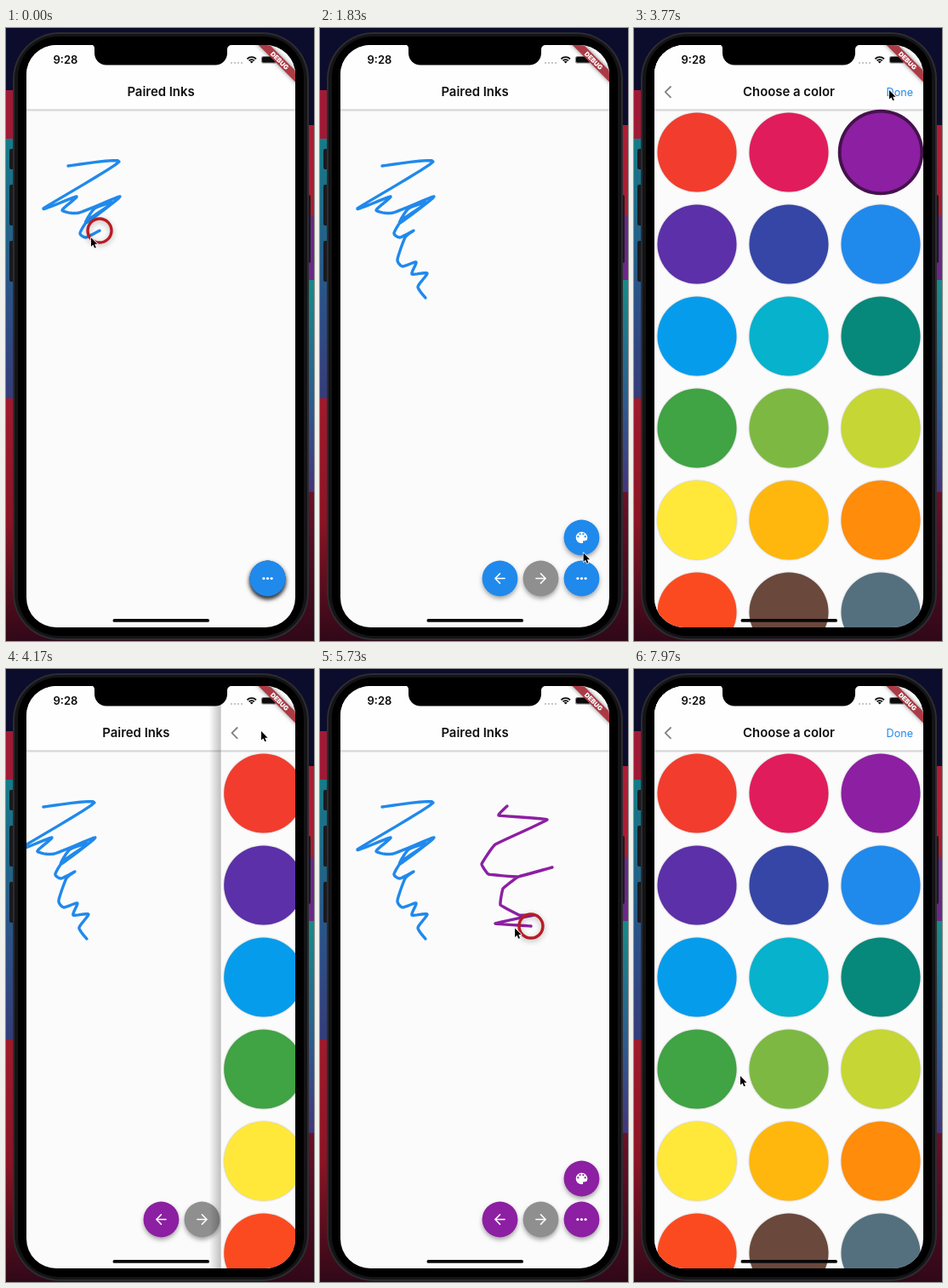
Write an HTML page with a canvas that moves like this. It is 362 by 720 pixels and loops after 8 s.

```html
<!DOCTYPE html>
<html lang="en">
<head>
<meta charset="utf-8">
<title>Drawing app</title>
<style>
html, body { margin: 0; width: 100%; height: 100%; overflow: hidden; background: #0c0c2c; }
canvas { display: block; width: 362px; height: 720px; }
</style>
</head>
<body>
<canvas id="stage"></canvas>
<script>
const W = 362, H = 720, LOOP = 8000;
const SCREEN = { x: 24, y: 20, w: 316, h: 684 };
const FONT = 'Inter, "Open Sans", sans-serif';
const BLUE = '#2089ec', PURPLE = '#8c1fa2', GREY = '#8f8f8f', INK = '#0c0c0c';
const SWATCHES = ['#f23c2e', '#e01c5c', PURPLE, '#5c30a8', '#3546a6', BLUE,
  '#069cec', '#06b2cc', '#06887a', '#40a344', '#7db942', '#c6d634', '#ffe83a',
  '#ffb70e', '#ff8c0a', '#fc4a20', '#6a483c', '#54707e'];

// Turning points of each stroke, reached one per step; bend rounds the corners.
const strokes = [
  { color: BLUE, start: -13 * 85, step: 85, bend: .3, keys: [
    [73,162], [133,157], [44,212], [83,198], [66,214], [86,217], [134,198], [94,229],
    [104,212], [126,205], [97,225], [87,241], [94,246], [110,238], [100,246], [91,272],
    [97,280], [113,275], [108,289], [126,288], [115,304], [124,317]] },
  { color: PURPLE, start: 5000, step: 52, bend: .12, keys: [
    [220,161], [210,172], [267,177], [206,206], [190,229], [198,241], [233,244], [273,233],
    [233,244], [215,258], [212,277], [234,289], [251,289], [206,299], [248,302], [229,304],
    [244,328]] }
];

// Where the pointer rests between strokes.
const stops = [
  { from: 680, to: 820, at: [124, 317] },
  { from: 1350, to: 1600, at: [309, 646] },
  { from: 2000, to: 2250, at: [310, 598] },
  { from: 3000, to: 3200, at: [290, 146] },
  { from: 3740, to: 4300, at: [300, 73] },
  { from: 4850, to: 5000, at: [216, 149] },
  { from: 5832, to: 6000, at: [244, 328] },
  { from: 6700, to: 7200, at: [318, 596] },
  { from: 7900, to: LOOP, at: [125, 478] }
];
const MENU_OPENS = 1400, PICKED = 3100, DONE = 4050;

const canvas = document.getElementById('stage');
const ctx = canvas.getContext('2d');
const clamp = (v, max = 1) => Math.max(0, Math.min(max, v));
const mix = (a, b, u) => a + (b - a) * u;
const smooth = u => u * u * (3 - 2 * u);
const easeOut = u => 1 - (1 - clamp(u)) ** 3;

// Cubic bezier (.35,.91,.33,.97) used by the page slide.
function slide(u) {
  if (u <= 0) return 0;
  if (u >= 1) return 1;
  const curve = (a, b, s) => 3 * (1 - s) ** 2 * s * a + 3 * (1 - s) * s * s * b + s ** 3;
  let lo = 0, hi = 1;
  for (let i = 0; i < 24; i++) {
    const mid = (lo + hi) / 2;
    if (curve(.35, .33, mid) < u) lo = mid; else hi = mid;
  }
  return curve(.91, .97, lo);
}

// The picker slides in, out and in again.
const pickerCover = t => [2060, DONE, 6842]
  .reduce((sum, start, i) => sum + (i % 2 ? -1 : 1) * slide((t - start) / 400), 0);

const progress = (s, t) => (t - s.start) / s.step;

// Cardinal spline through the keys.
function pointAt({ keys, bend }, i) {
  const last = keys.length - 1;
  i = clamp(i, last);
  const k = Math.min(Math.floor(i), last - 1), u = i - k;
  const key = n => keys[clamp(n, last)];
  return [0, 1].map(d => {
    const a = key(k)[d], b = key(k + 1)[d];
    const inA = bend * (b - key(k - 1)[d]), inB = bend * (key(k + 2)[d] - a);
    return mix(a, b, smooth(u)) + u * (1 - u) * ((1 - u) * inA - u * inB);
  });
}

function activeStroke(t) {
  return strokes.find(s => t >= s.start && progress(s, t) <= s.keys.length - 1);
}

function pointer(t) {
  const s = activeStroke(t);
  if (s) return pointAt(s, progress(s, t) + 1);
  const k = Math.max(0, stops.findLastIndex(p => p.from <= t));
  const here = stops[k], next = stops[k + 1];
  if (!next || t < here.to) return here.at;
  const u = smooth((t - here.to) / (next.from - here.to));
  return [0, 1].map(d => mix(here.at[d], next.at[d], u));
}

function box(x, y, w, h, r, fill) {
  ctx.beginPath();
  ctx.roundRect(x, y, w, h, r);
  ctx.fillStyle = fill;
  ctx.fill();
}

function disc(x, y, r, fill) {
  ctx.beginPath();
  ctx.arc(x, y, r, 0, 7);
  ctx.fillStyle = fill;
  ctx.fill();
}

function line(pts, color, width) {
  ctx.beginPath();
  pts.forEach(p => ctx.lineTo(...p));
  ctx.strokeStyle = color;
  ctx.lineWidth = width;
  ctx.stroke();
}

function text(str, x, y, font, color, align = 'center') {
  ctx.font = `${font} ${FONT}`;
  ctx.fillStyle = color;
  ctx.textAlign = align;
  ctx.fillText(str, x, y);
}

function shadow(color, blur, dy) {
  const k = window.devicePixelRatio || 1;
  ctx.shadowColor = color;
  ctx.shadowBlur = blur * k;
  ctx.shadowOffsetY = dy * k;
}
const noShadow = () => shadow('transparent', 0, 0);

function fade(x0, y0, x1, y1, colors) {
  const g = ctx.createLinearGradient(x0, y0, x1, y1);
  colors.forEach((c, i) => g.addColorStop(i / (colors.length - 1), c));
  return g;
}

// Each band runs from its top to the bottom of the stage, over the previous one.
function wallpaper(x, bands) {
  for (const [top, ...colors] of bands) {
    ctx.fillStyle = fade(0, top, 0, H, colors);
    ctx.fillRect(x, top, W / 2, H - top);
  }
}

function drawPhone() {
  ctx.fillStyle = '#0c0c2c';
  ctx.fillRect(0, 0, W, H);
  wallpaper(0, [[73, '#a01a36', '#a01a36'], [130, '#147c88', '#2c5088', '#3c2c70', '#3c2c70'],
    [435, '#a01a2c', '#8c1424', '#300818']]);
  wallpaper(W / 2, [[114, '#b01c34', '#a01a34'], [221, '#6c2888', '#6c2888'],
    [296, '#148c88', '#2c5c90', '#4c2878', '#4c2878'], [545, '#6c1028', '#300818']]);
  ctx.fillStyle = '#0c0c2c';
  ctx.fillRect(20, 0, 322, 20);
  [[142, 24], [184, 48], [250, 48]].forEach(([y, h]) => box(4, y, 6, h, 2, '#1a1a1e'));
  box(354, 196, 4, 80, 2, '#1a1a1e');
  box(8, 5, 348, 714, 55, '#2c2c30');
  box(10, 7, 344, 710, 53, '#141416');
  box(14, 10, 336, 704, 48, '#000');
}

function navBar(title) {
  const { x, y, w, h } = SCREEN;
  ctx.fillStyle = '#fbfbfb';
  ctx.fillRect(x, y, w, h);
  ctx.fillStyle = '#fefefe';
  ctx.fillRect(x, y, w, 76);
  ctx.fillStyle = fade(0, 95.5, 0, 98.5, ['#c6c6c6', '#fbfbfb']);
  ctx.fillRect(x, 95.5, w, 3);
  text(title, 182, 80, '600 14.9px', '#101010');
}

function button(x, y, color, icon) {
  shadow('rgba(0,0,0,.34)', 5, 3);
  disc(x, y, 20.9, color);
  noShadow();
  ctx.save();
  ctx.translate(x, y);
  icon(color);
  ctx.restore();
}

const dots = () => [-4.6, 0, 4.6].forEach(x => disc(x, 0, 1.6, '#fff'));
const arrow = dir => () => {
  line([[-5.6 * dir, 0], [5.4 * dir, 0]], '#fff', 1.5);
  line([[0, -5.6], [5.6 * dir, 0], [0, 5.6]], '#fff', 1.5);
};
function paletteIcon(color) {
  disc(0, 0, 6.8, '#fff');
  box(1.6, 3, 6, 5, 2, color);
  disc(3.4, .6, 3.3, '#fff');
  for (const side of [-1, 1]) {
    disc(4.2 * side, -1.1, 1.15, color);
    disc(1.9 * side, -4.2, 1.15, color);
  }
}

function drawBoard(t) {
  navBar('Paired Inks');
  for (const s of strokes) {
    const end = Math.min(progress(s, t), s.keys.length - 1);
    if (end < 0) continue;
    const pts = [];
    for (let i = 0; i < end; i += .125) pts.push(pointAt(s, i));
    line([...pts, pointAt(s, end)], s.color, 3.4);
  }
  const color = t >= DONE ? PURPLE : BLUE;
  const spread = 48 * easeOut((t - MENU_OPENS) / 280);
  const x = 307.5, y = 646.5;
  button(x - 2 * spread, y, color, arrow(-1));
  button(x - spread, y, GREY, arrow(1));
  button(x, y - spread, color, paletteIcon);
  button(x, y, color, dots);
}

function drawPicker(t) {
  navBar('Choose a color');
  line([[43, 69], [36.8, 75.2], [43, 81.4]], '#808080', 1.8);
  text('Done', 328, 79.8, '400 12.6px', BLUE, 'right');
  SWATCHES.forEach((color, i) => {
    const x = 74 + 108 * (i % 3), y = 146 + 108 * Math.floor(i / 3);
    if (color === PURPLE && t > PICKED && t < DONE + 400) disc(x, y, 50.3, '#46124e');
    shadow('rgba(0,0,0,.3)', 2, 0);
    disc(x, y, 46.5, color);
    noShadow();
  });
}

function drawPages(t) {
  const { x, y, w, h } = SCREEN;
  const cover = pickerCover(t);
  ctx.save();
  ctx.translate(-cover * w / 3, 0);
  drawBoard(t);
  ctx.restore();
  if (cover <= 0) return;

  ctx.save();
  ctx.translate((1 - cover) * w, 0);
  ctx.fillStyle = fade(x - 14, 0, x, 0, ['rgba(0,0,0,0)', 'rgba(0,0,0,.24)']);
  ctx.fillRect(x - 14, y, 14, h);
  ctx.beginPath();
  ctx.rect(x, y, w, h);
  ctx.clip();
  drawPicker(t);
  ctx.restore();
}

function drawStatus() {
  text('9:28', 70, 42, '600 13px', INK);
  for (let i = 0; i < 4; i++) disc(265 + i * 4, 41, 1, '#b4b4b4');
  ctx.lineCap = 'butt';
  for (const r of [1.4, 4.5, 7.5]) {
    ctx.beginPath();
    ctx.arc(288.7, 41.6, r, -Math.PI * .75, -Math.PI * .25);
    ctx.strokeStyle = INK;
    ctx.lineWidth = r < 2 ? 2.8 : 1.8;
    ctx.stroke();
  }
  ctx.lineCap = 'round';
  box(300, 33, 18, 8.6, 2.6, '#858585');
  box(301, 34, 16, 6.6, 1.8, INK);

  ctx.save();
  ctx.translate(340, 20);
  ctx.rotate(Math.PI / 4);
  shadow('rgba(0,0,0,.5)', 5, 0);
  ctx.fillStyle = '#ac3a44';
  ctx.fillRect(-40, 21.2, 80, 9.4);
  noShadow();
  text('DEBUG', 0, 28.7, '900 7.6px', '#fff');
  ctx.restore();
}

function drawNotch() {
  ctx.beginPath();
  ctx.moveTo(99, 19);
  ctx.arcTo(104, 20, 104, 25, 5);
  ctx.arcTo(104, 43.5, 119, 43.5, 14);
  ctx.arcTo(260, 43.5, 260, 28, 14);
  ctx.arcTo(260, 20, 265, 20, 5);
  ctx.lineTo(265, 19);
  ctx.fill();
}

function drawRing(x, y) {
  shadow('rgba(0,0,0,.3)', 6, 2);
  ctx.beginPath();
  ctx.arc(x, y, 14, 0, 7);
  ctx.strokeStyle = '#b81c24';
  ctx.lineWidth = 3.4;
  ctx.stroke();
  noShadow();
}

function drawCursor([x, y]) {
  ctx.save();
  ctx.translate(x, y);
  ctx.scale(.84, .84);
  const tip = [[0, 0], [0, 12.6], [2.9, 10], [5, 14.6], [7, 13.7], [5, 9.2], [9, 9.2], [0, 0]];
  line(tip, '#fff', 1.8);
  ctx.fillStyle = '#000';
  ctx.fill();
  ctx.restore();
}

function draw(t) {
  const k = window.devicePixelRatio || 1;
  if (canvas.width !== Math.round(W * k)) {
    canvas.width = Math.round(W * k);
    canvas.height = Math.round(H * k);
  }
  ctx.setTransform(k, 0, 0, k, 0, 0);
  ctx.lineCap = ctx.lineJoin = 'round';
  drawPhone();

  ctx.save();
  ctx.beginPath();
  ctx.roundRect(SCREEN.x, SCREEN.y, SCREEN.w, SCREEN.h, 35);
  ctx.clip();
  drawPages(t);
  drawStatus();
  box(125.5, 694, 113.5, 3.8, 1.9, '#080808');
  ctx.restore();
  ctx.fillStyle = '#000';
  drawNotch();

  const s = activeStroke(t);
  if (s) drawRing(...pointAt(s, progress(s, t)));
  drawCursor(pointer(t));
}

const start = performance.now();
function tick() {
  draw((performance.now() - start) % LOOP);
  requestAnimationFrame(tick);
}
tick();
</script>
</body>
</html>
```
